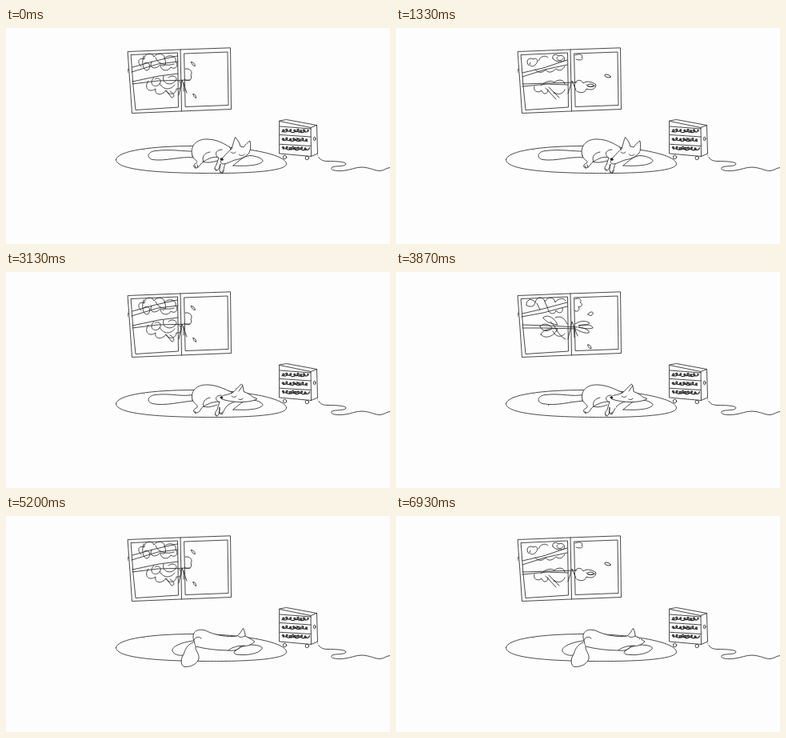
These frames come from a looping animation (480 px wide and 270 px high, 6.99 s). An HTML page:

```html
<!DOCTYPE html>
<html lang="en">
<head>
<meta charset="utf-8">
<title>Sleeping fox</title>
<style>
  html, body { margin: 0; width: 100%; height: 100%; overflow: hidden; background: #fdfdfd; }
  svg { display: block; width: 480px; height: 270px; }
  path, ellipse, circle { fill: none; stroke: #2a2a2a; stroke-width: .85; stroke-linecap: round; stroke-linejoin: round; }
  .solid { fill: #fdfdfd; }
  .ink { fill: #222; }
  .hide { display: none; }
  #coils { stroke-width: 1.25; }
</style>
</head>
<body>
<svg viewBox="0 0 480 270">
  <defs>
    <filter id="line0" filterUnits="userSpaceOnUse" x="0" y="0" width="480" height="270" color-interpolation-filters="sRGB">
      <feTurbulence type="fractalNoise" baseFrequency=".14" numOctaves="2" seed="3"/>
      <feDisplacementMap in="SourceGraphic" scale="1.5" xChannelSelector="R" yChannelSelector="G"/>
    </filter>
    <filter id="line1" filterUnits="userSpaceOnUse" x="0" y="0" width="480" height="270" color-interpolation-filters="sRGB">
      <feTurbulence type="fractalNoise" baseFrequency=".14" numOctaves="2" seed="8"/>
      <feDisplacementMap in="SourceGraphic" scale="1.5" xChannelSelector="R" yChannelSelector="G"/>
    </filter>
    <filter id="line2" filterUnits="userSpaceOnUse" x="0" y="0" width="480" height="270" color-interpolation-filters="sRGB">
      <feTurbulence type="fractalNoise" baseFrequency=".14" numOctaves="2" seed="14"/>
      <feDisplacementMap in="SourceGraphic" scale="1.5" xChannelSelector="R" yChannelSelector="G"/>
    </filter>
    <path id="cushion" class="solid" d="M284 172C290 167 297 160 305 159.5C313 160 321 163 321 166.5C317 172 300 173 284 172Z"/>
  </defs>

  <g filter="url(#line0)">
    <!-- window -->
    <path d="M152.5 29.5L216 27L280.5 24.8L281 60L281.5 101.5L218 104L157.5 106.5L155 70Z"/>
    <path d="M156.5 33.5L214.5 31L215.5 99L162 102.5L159 72Z"/>
    <path d="M218 27L218.8 66L219.5 104"/>
    <path d="M223 32L277 30L278 96.5L224.5 98.5Z"/>
    <!-- rug -->
    <path d="M137.5 164.5C139 153 184 147.5 236 147.5C296 147.5 350 157.5 350.5 170C350 180 292 182 246 181.5C190 181 137 177.5 137.5 164.5Z"/>
    <!-- heater -->
    <path class="solid" d="M342 116L350.5 114.5L388.5 121.5L389.5 157L381.5 160.5L342 157Z"/>
    <path d="M342 116.5L381 124.5L381.5 160.5M381 124.5L388.5 121.5M342.5 123L381 126M342.5 133.5L381 136M342.5 145.3L381 147.5"/>
    <ellipse cx="385.7" cy="138.5" rx="1.3" ry="2.3"/>
    <circle cx="348.5" cy="161.5" r="2.2"/>
    <circle cx="376.3" cy="162.5" r="2.2"/>
    <path id="coils"/>
    <path d="M389.5 158C391 164 395 166.5 402 166.5C411 166.5 423 167 425 169.5C425 174 411 171.5 407 174.5C405 178 414 179.5 424 178C432 177 437 174 445 174C456 174.5 462 179 468 178.5C474 177.5 475 175 480 174.5"/>
  </g>

  <g class="tree">
    <path d="M158 49L187 41L214 35M157 55L190 45L215 42M158 67L191 60L215 57M158 70L190 66L230 65"/>
    <path d="M169 48C163 43 166 36 173 39C172 31 183 30 185 36C189 30 199 32 198 38C204 32 214 35 212 42C217 47 211 53 206 49C203 55 193 54 193 46C186 53 178 50 182 42"/>
    <path d="M172 35C168 47 174 56 178 52C183 46 176 40 172 45M187 37C190 46 202 48 210 45M198 38C202 45 198 50 194 46"/>
    <path d="M178 66C172 74 178 82 187 76C185 84 195 85 200 78C203 85 213 83 213 76C220 77 221 70 216 66M185 62C178 68 184 76 191 71C197 66 190 60 186 64M197 60C194 69 205 73 211 67C217 62 208 57 203 62M192 69C197 79 207 77 211 71M200 78L207 87C212 87 210 81 205 79"/>
    <path d="M224 51C230 50 234 55 231 59C234 65 227 68 223 64M216 84L220 65L226 81M222 68L222 79"/>
    <path d="M231.5 42.5C234 42.5 236 44.5 236.5 47.5C234 47.5 232 45.5 231.5 42.5ZM234 82.5C236 82.5 238 84.5 237.5 87.5C235 86.5 234 84.5 234 82.5Z"/>
  </g>

  <g class="tree">
    <path d="M158 56L184 50L214 40M158 61L186 52L214 46M158 70L190 69L226 68M158 73L190 70L215 71"/>
    <path d="M166 47C161 41 166 36 172 39C176 36 179 42 174 46C170 50 165 47 168 43M178 41C181 34 188 34 190 37M196 38C194 33 201 32 203 35C209 33 212 37 210 41C206 43 198 42 196 38M202 36C198 40 207 43 209 38"/>
    <path d="M174 52C178 57 184 56 187 52C191 58 197 54 200 51C204 55 209 52 211 48"/>
    <path d="M173 73C171 79 177 82 182 78C184 85 191 82 190 77M181 72C188 66 194 65 198 68C203 63 211 65 211 70M187 75L200 89M191 74L204 87M197 80C203 85 209 82 211 77"/>
    <path d="M224 34C230 31 235 34 232 37C236 40 228 41 225 39M224 68C228 63 233 66 234 69C239 65 247 68 250 71C247 75 240 74 238 71M226 79C231 82 237 81 238 76C244 78 249 77 250 72M215 82L220 66L225 78"/>
    <ellipse cx="243" cy="71.7" rx="4.2" ry="1.6"/>
    <ellipse cx="264.5" cy="60" rx="3.8" ry="1.7" transform="rotate(18 264.5 60)"/>
  </g>

  <g class="tree">
    <path d="M158 52L184 46L214 38M157 56L184 51L214 43M158 66L190 67L227 69M158 70L190 70L224 71"/>
    <path d="M163 42C162 34 170 32 174 38C176 30 184 30 186 37C190 30 198 31 199 38C203 32 211 32 212 36M164 42C169 45 174 42 174 38M176 39L180 47M186 37L190 46M190 47C192 54 199 53 200 48C204 54 210 50 208 45"/>
    <path d="M184 57C189 52 198 57 202 66C194 65 186 62 184 57M180 68C184 63 192 65 195 70C191 76 182 74 180 68M181 78C183 72 193 70 202 71C198 80 187 85 181 78M193 62C199 66 202 80 212 84M199 57C206 54 211 58 214 65M196 74C200 82 207 82 211 77"/>
    <path d="M224 34C229 31 233 35 230 38C235 40 231 45 228 43C231 48 226 51 223 48M224 65C230 60 239 61 242 64C239 67 233 67 228 67C238 64 246 67 246 70C241 72 233 70 228 69C236 70 243 73 241 76C234 77 228 73 224 71M215 84L220 62L227 80M222 67L223 82"/>
    <path d="M240 53C241 50 245 49 246.5 51C246 54 243 56 240 53ZM240 91C243 91 244 93 244 96C241 95 239 93 240 91Z"/>
  </g>

  <!-- curled up, face forward -->
  <g class="fox">
    <path class="solid" d="M235 154C220 154.5 207 151 187 153.5C177 154.5 175 162 183 164.5C199 167 218 160 235 162Z"/>
    <use href="#cushion"/>
    <path class="solid" d="M233 160C229 147 239 138.5 251 139C264 139 273 145 280 149L283 162C275 166 272 172 272 179C270 183 266 181 267 176L268 170C267 173 267 176 264 178C260 178 260 175 263 171L266 162C260 160 253 163 247 167C243 169 242 174 238 175C233 175 234 170 238 169C242 166 235 166 233 160Z"/>
    <path d="M247 167C244 161 248 156 255 155M264 161C260 156 264 152 270 152M246 167C250 169 258 168 264 166"/>
    <path class="solid" d="M282 151C284 145 285 140 286.5 136.5C290 140 292 144 293 148L297 149C299 146 302 143 305 141C306 147 306 152 304 156C300 161 293 164 286 165C280 167 276 170 271 170C267 169 268 165 271 162C276 157 278 154 282 151Z"/>
    <path d="M281 155C283 157 286 157 287 155M291 158C293 160 296 160 298 158"/>
    <path class="ink" d="M268 163.5C269.5 162 271.5 163 271.5 165C269.5 166 268.5 165 268 163.5Z"/>
    <path d="M236 172L237 175M239 171L240 174M262 176L263 178M268 179L270 182M271 178L271 181"/>
  </g>

  <!-- stretched, head on the cushion -->
  <g class="fox">
    <path class="solid" d="M235 153C221 157 207 151 187 153.5C177 154.5 175 162 183 164.5C199 168 218 162 235 161Z"/>
    <use href="#cushion"/>
    <path class="solid" d="M233 160C230 148 239 140.5 252 141C265 141.5 274 147 284 151L287 162C278 164 274 169 271 176C268 179 265 177 267 172L267 169C267 173 267 178 264 180C260 179 261 176 264 172L267 162C258 162 252 165 247 168C243 170 243 175 239 176C233 176 233 172 238 170C242 167 235 165 233 160Z"/>
    <path d="M247 168C245 163 249 158 255 157M265 162C260 158 263 154 269 154M247 168C252 170 259 168 264 166"/>
    <path class="solid" d="M282 151.5C287 149 290 143 294.5 140C296 142 297 146 297 149.5C302 151 306 154 309 156.5L314 158.5C308 162 300 162.5 292 162.5C285 162.5 276 161 270 159C267 157 269 155 273 154C277 153.5 279 152.5 282 151.5Z"/>
    <path d="M291 149L296 142M282 155C284 157 287 157 288 155M291 159C293 160 295 160 296 158"/>
    <path class="ink" d="M268 156.5C269 155 271 156 271 157.5C270 159 268 158 268 156.5Z"/>
    <path d="M236 174L237 177M262 178L263 180M267 175L268 177M270 175L270 178"/>
  </g>

  <!-- turned away -->
  <g class="fox">
    <path class="solid" d="M286 169C292 165 297 161 304 161C314 161 322 163 320 166C316 172 301 175 288 173C284 172 285 170 286 169Z"/>
    <path class="solid" d="M235 156C231 146 238 140 249 143C261 149 277 152 289 150C292 148 294 144 296.5 140.5C298 143 299 147 299 150C303 152 307 154 311 157C306 162 300 163 293 163C290 167 286 169 278 168C263 168 249 166 237 163Z"/>
    <path d="M235 156C222 157 206 163 208 169C210 173 216 175 222 174M235 155C237 151 241 150 244 153M290 150C292 152 296 152 299 150M278 168C282 164 290 162 298 162"/>
    <path class="solid" d="M234 158C226 161 224 167 222 173C218 178 218 187 223 188.5C232 189 240 184 241 178C242 172 236 168 237 163"/>
  </g>
</svg>
<script>
  const loop = 6990, slot = 1000 / 15;
  const holds = [5, 12, 20, 27, 35, 41, 45, 52, 61, 75, 82, 90, 97];
  const swing = [0, 1, 2, 1];
  const trees = [...document.querySelectorAll('.tree')];
  const foxes = [...document.querySelectorAll('.fox')];

  // Heater coils: three rows of handwritten loops
  let coils = '';
  for (let row = 0; row < 3; row++) {
    for (let i = 0; i <= 130; i++) {
      const u = i / 130, a = u * Math.PI * (15 + row) + Math.sin(u * 9 + row);
      const x = 345 + 32.5 * u + 2 * Math.sin(a);
      const y = 128 + row * 11 + u + 1.5 * Math.cos(a) + .6 * Math.sin(a * .4 + row);
      coils += (i ? 'L' : 'M') + x.toFixed(1) + ' ' + y.toFixed(1);
    }
  }
  document.getElementById('coils').setAttribute('d', coils);

  function show(list, index, drawing) {
    list.forEach((g, i) => g.classList.toggle('hide', i !== index));
    list[index].setAttribute('filter', `url(#line${drawing})`);
  }

  function draw(time) {
    const tick = Math.floor((time % loop + 5) / slot) % 105;
    const step = tick - holds.filter(h => h <= tick).length;
    const drawing = swing[step % 4];
    show(trees, drawing, drawing);
    show(foxes, tick < 44 ? 0 : tick < 76 ? 1 : 2, drawing);
  }

  const start = performance.now();
  function frame() {
    draw(performance.now() - start);
    requestAnimationFrame(frame);
  }
  frame();
</script>
</body>
</html>
```
